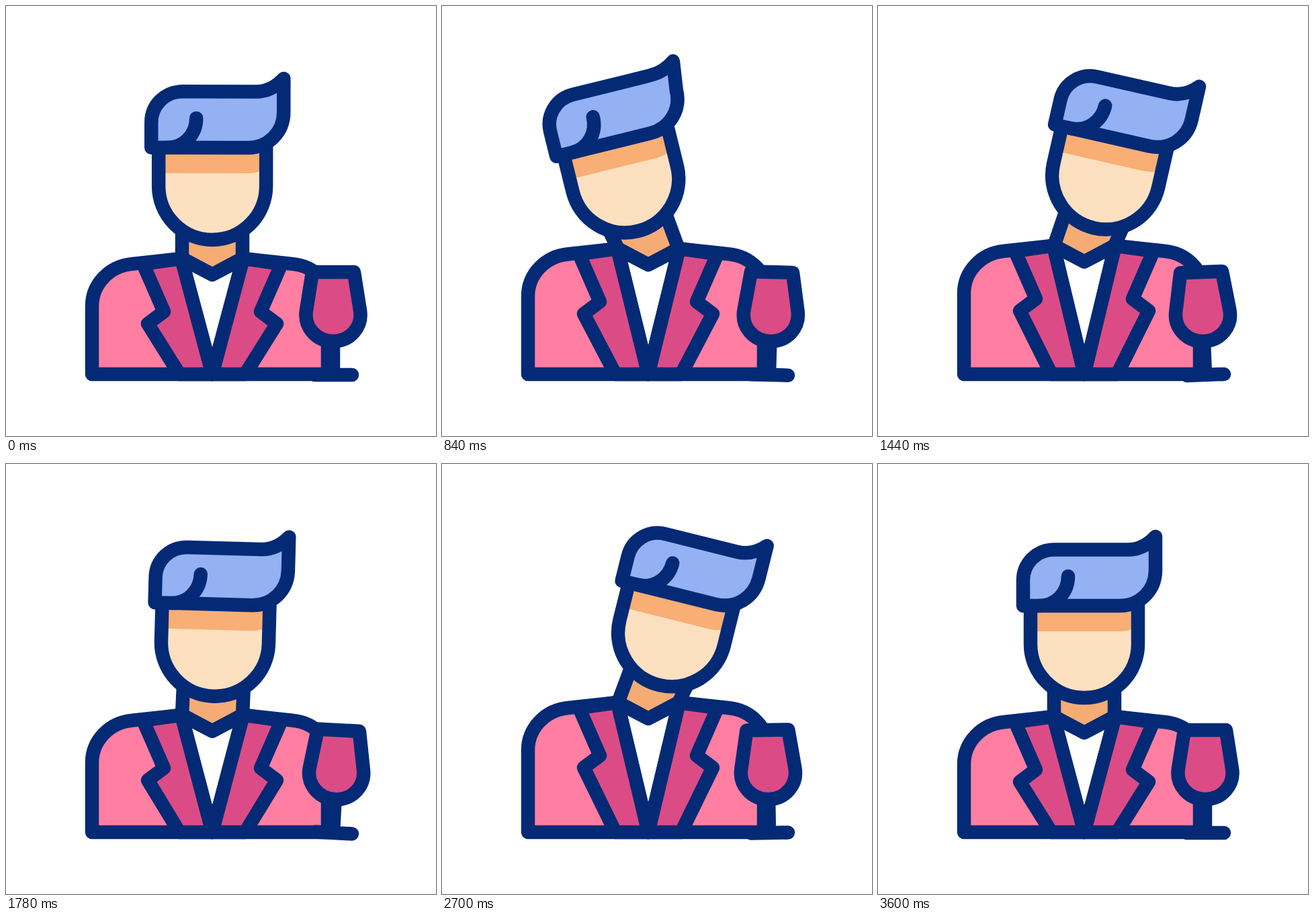
Write an HTML page that moves like this. It is 640x640 px and loops after 3620 ms.

```html
<!DOCTYPE html>
<html lang="en">
<head>
<meta charset="utf-8">
<title>Man with a wine glass</title>
<style>
  html, body { margin: 0; width: 100%; height: 100%; overflow: hidden; background: #fff; }
  svg { display: block; width: 100vw; height: 100vh; }
  .line { fill: none; stroke: #042a76; stroke-width: 20.5; stroke-linecap: round; stroke-linejoin: round; }
  .butt { stroke-linecap: butt; }
  .coat { fill: #ff7ea1; }
  .wine { fill: #db4c86; }
  .neck { fill: #f4ac74; }
  .face { fill: #fce0bf; }
  .shade { fill: #f8ae74; }
  .hair { fill: #94b1f4; }
  .shirt { fill: #fff; }
</style>
</head>
<body>
<svg viewBox="0 0 640 640">
  <path id="neck" class="line neck"/>
  <g id="head">
    <path class="face" d="M227 211V268A80 80 0 0 0 387 268V211Z"/>
    <path class="shade" d="M227 211H387V240Q377 249 360 249H227Z"/>
    <path class="line butt" d="M227 211V268A80 80 0 0 0 387 268V205"/>
    <path id="hair" class="line hair"/>
    <path class="line" d="M283 167C283 191 265 211 240 211"/>
  </g>
  <path id="coat" class="line coat"/>
  <path id="shirt" class="line shirt"/>
  <path id="left" class="line wine"/>
  <path id="right" class="line wine"/>
  <g id="glass">
    <path class="line" d="M487 499V549M460 549H515"/>
    <path class="line wine" d="M456 396H518L527 453C531 478 512 499 487 499S443 478 447 453Z"/>
  </g>
</svg>
<script>
const LOOP = 3620, BEAT = 600, SWAY = 1200;
const TILTS = [0, 5, -5, 3, -3, 1, 0];
const PIVOT = { x: 307, y: 413 };
const el = id => document.getElementById(id);
const set = (id, name, value) => el(id).setAttribute(name, value);

function glassTilt(t) {
  const i = Math.min(Math.floor(t / BEAT), TILTS.length - 2);
  const p = t / BEAT - i;
  return TILTS[i] + (TILTS[i + 1] - TILTS[i]) * (1 - Math.cos(Math.PI * p)) / 2;
}

function headTilt(t) {
  const x = 2 * Math.PI * t / SWAY;
  return 14 * Math.sin(x) - 0.9 * Math.sin(2 * x);
}

// Position of a head point after the sway and the lift.
function onHead(x, y, deg, lift) {
  const a = deg * Math.PI / 180, dx = x - PIVOT.x, dy = y - PIVOT.y;
  return [PIVOT.x + dx * Math.cos(a) - dy * Math.sin(a),
          PIVOT.y + dx * Math.sin(a) + dy * Math.cos(a) - lift];
}

function drawBody(deg, lift) {
  const up = y => y - lift;
  const lapel = fx =>
    `M${fx(204)} ${up(384)}L${fx(235)} ${up(455)}L${fx(211)} ${up(473)}` +
    `L${fx(258)} 548H307L${fx(261)} ${up(376)}Z`;
  const a = onHead(262, 320, deg, lift), b = onHead(352, 320, deg, lift);
  set("neck", "d", `M${a}L262 ${up(376)}L307 ${up(400)}L352 ${up(376)}L${b}Z`);
  set("coat", "d",
    `M128 548V${up(447)}C128 ${up(414)} 154 ${up(387)} 188 ${up(384)}` +
    `L262 ${up(376)}L307 ${up(400)}L352 ${up(376)}L426 ${up(384)}` +
    `C460 ${up(387)} 486 ${up(414)} 486 ${up(447)}L479 498V548Z`);
  set("shirt", "d", `M261 ${up(376)}L307 ${up(400)}L353 ${up(376)}L307 548Z`);
  set("left", "d", lapel(x => x));
  set("right", "d", lapel(x => 614 - x));
}

function drawHead(deg, lift) {
  const bend = 7 * Math.tanh(Math.max(0, -deg) / 6);
  const tx = 413 + bend * 0.8, ty = 108 + bend;
  set("head", "transform", `translate(0 ${-lift}) rotate(${deg} ${PIVOT.x} ${PIVOT.y})`);
  set("hair", "d",
    `M216 211V173C216 148 236 127.5 262 127.5H372C388 127.5 402 ${ty + 12} ${tx} ${ty}` +
    `L413 158C413 188 390 211 360 211Z`);
}

function draw(t) {
  const deg = headTilt(t);
  const lift = deg > 0 ? deg * 1.5 : -deg * 1.07;
  drawBody(deg, lift);
  drawHead(deg, lift);
  set("glass", "transform", `rotate(${glassTilt(t)} 487 549)`);
}

function tick() {
  draw(Math.min(performance.now() % LOOP, BEAT * 6));
  requestAnimationFrame(tick);
}
tick();
</script>
</body>
</html>
```
